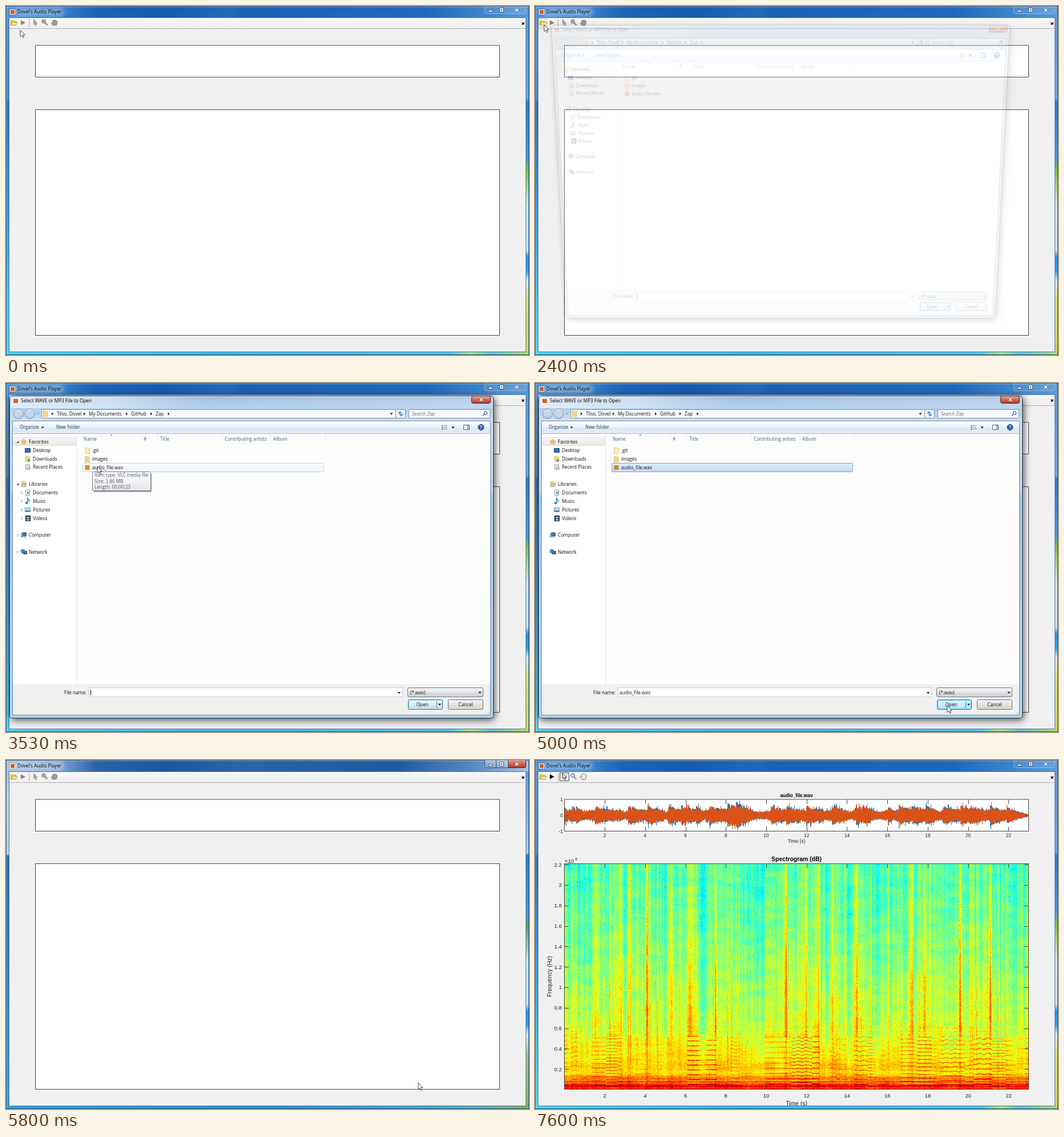
These frames come from a looping animation (916x611 px, 7740 ms). An HTML page with a canvas:

```html
<!DOCTYPE html>
<html lang="en">
<head>
<meta charset="utf-8">
<title>Audio player</title>
<style>
html, body { margin: 0; width: 100%; height: 100%; overflow: hidden; background: #f0f0f0; }
canvas, svg { position: absolute; left: 0; top: 0; }
#dialog { transform-origin: 430px 304px; }
</style>
</head>
<body>
<canvas id="main" width="916" height="611"></canvas>
<canvas id="dialog" width="916" height="611"></canvas>
<svg id="cursor" width="12" height="18" viewBox="-1 -1 12 18"><path d="M0 0V11.6L2.7 9.2 4.6 13.4 6.4 12.6 4.6 8.6H8.2Z" fill="#fff" stroke="#222" stroke-width=".8"/></svg>
<script>
const $ = id => document.getElementById(id);
const mainCtx = $('main').getContext('2d'), dialogCtx = $('dialog').getContext('2d');
const UI = '8.2px "Open Sans", "Noto Sans", sans-serif';
const plotFont = (size, bold = '') => `${bold} ${size}px "Liberation Sans", Arial, sans-serif`;
let g = mainCtx;

const clamp = (v, a = 0, b = 1) => Math.min(b, Math.max(a, v));
function seeded(s) {
  return () => {
    s = s + 0x6D2B79F5 | 0;
    let r = Math.imul(s ^ s >>> 15, 1 | s);
    r = r + Math.imul(r ^ r >>> 7, 61 | r) ^ r;
    return ((r ^ r >>> 14) >>> 0) / 4294967296;
  };
}

// Drawing helpers on the current context g
function grad(x0, y0, x1, y1, ...stops) {
  const l = g.createLinearGradient(x0, y0, x1, y1);
  for (let i = 0; i < stops.length; i += 2) l.addColorStop(stops[i], stops[i + 1]);
  return l;
}
const down = (y, h, a, b) => grad(0, y, 0, y + h, 0, a, 1, b);
function fill(x, y, w, h, c) { g.fillStyle = c; g.fillRect(x, y, w, h); }
function box(x, y, w, h, bg, edge, r = 0) {
  g.beginPath();
  g.roundRect(x + .5, y + .5, w - 1, h - 1, r);
  if (bg) { g.fillStyle = bg; g.fill(); }
  if (edge) { g.strokeStyle = edge; g.lineWidth = 1; g.stroke(); }
}
function path(d, x, y, bg, edge, w = 1) {
  const p = new Path2D(d);
  g.save();
  g.translate(x, y);
  if (bg) { g.fillStyle = bg; g.fill(p); }
  if (edge) { g.strokeStyle = edge; g.lineWidth = w; g.stroke(p); }
  g.restore();
}
function disc(x, y, r, bg, edge, w = 1) {
  g.beginPath();
  g.arc(x, y, r, 0, 7);
  if (bg) { g.fillStyle = bg; g.fill(); }
  if (edge) { g.strokeStyle = edge; g.lineWidth = w; g.stroke(); }
}
// y is the visual middle of the line
function text(s, x, y, color = '#111', font = UI, align = 'left') {
  g.font = font; g.fillStyle = color; g.textAlign = align;
  g.fillText(s, x, y + parseFloat(font.match(/[\d.]+px/)) * .36);
}
const arrowRight = (x, y, c = '#222') => path('M-1.5-2.8L1.6 0-1.5 2.8Z', x, y, c);
const arrowDown = (x, y, c = '#222') => path('M-2.8-1.5H2.8L0 1.7Z', x, y, c);
const folder = (x, y, c = '#f3d77a') => path('M-4-5H0L1-4H4V5H-4Z', x, y, c, '#d5b455', .6);
function captionMark(x, kind) {
  if (kind === 'min') box(x - 4, 7, 8, 4, '#fff', '#456');
  if (kind === 'max') { box(x - 4, 3, 8, 8, '#fff', '#456'); fill(x - 1.5, 6, 3, 2, '#456'); }
  if (kind === 'close') {
    path('M-2.6-2.6L2.6 2.6M2.6-2.6L-2.6 2.6', x, 7, null, '#456', 3);
    path('M-2.6-2.6L2.6 2.6M2.6-2.6L-2.6 2.6', x, 7, null, '#fff', 1.6);
  }
}

// Plot geometry: seconds and kHz to pixels
const timeX = s => 51.3 + s * 35.37, freqY = k => 577 - k * 17.9;
const dips = [[58, 5], [86, 13], [157, 4], [229, 3], [294, 7], [392, 17], [507, 9], [552, 6], [601, 10], [628, 6], [706, 6], [845, 20]];
const hits = [[105, .05], [152, .06], [197, .1], [239, .09], [271, .13], [316, .14], [439, .14], [475, .1], [519, .07], [564, .08], [659, .13], [681, .14], [745, .13], [797, .16]];
const beats = [51, 72, 105, 163, 197, 233, 256, 282, 305, 337, 352, 413, 440, 475, 497, 520, 562, 575, 618, 637, 661, 684, 715, 745, 762, 797, 826];
const near = (x, c, w) => Math.exp(-(((x - c) / w) ** 2));
const quiet = x => dips.reduce((s, [c, w]) => s + near(x, c, w), 0);

function makeSpectrogram() {
  const W = 813, H = 394, rnd = seeded(7);
  const c = Object.assign(document.createElement('canvas'), { width: W, height: H });
  const ctx = c.getContext('2d'), img = ctx.createImageData(W, H);
  const profile = [[0, .9], [.35, .88], [.8, .79], [1.6, .71], [3, .655], [5.1, .62], [5.6, .585], [9, .565], [12, .535], [16, .5], [22.1, .465]];
  const base = k => {
    const i = Math.max(1, profile.findIndex(p => p[0] >= k));
    const [a, u] = profile[i - 1], [b, v] = profile[i];
    return u + (v - u) * (k - a) / (b - a);
  };
  const blobs = Array.from({ length: 2000 }, rnd);
  const blob = (x, y) => {
    const i = x | 0, j = y | 0, u = x - i, v = y - j, at = (a, b) => blobs[(a * 37 + b) % 2000];
    return (at(i, j) * (1 - u) + at(i + 1, j) * u) * (1 - v) + (at(i, j + 1) * (1 - u) + at(i + 1, j + 1) * u) * v - .5;
  };
  const rowLine = Array.from({ length: H }, () => rnd() ** 4);
  let band = 0, bandEnd = 0, pitch = .3, noteEnd = 0, loud = 1, bend = 0;
  for (let x = 0; x < W; x++) {
    const sx = x + 52, calm = quiet(sx);
    if (x >= bandEnd) { band = (rnd() - .5) * .1; bandEnd = x + 1 + rnd() * 5; }
    if (x >= noteEnd) { pitch = .28 + rnd() * .24; loud = rnd() * 1.1; bend = rnd() < .3 ? .015 : 0; noteEnd = x + 9 + rnd() * 28; }
    let column = band + (rnd() - .5) * .04 + (rnd() < .06 ? .07 : 0);
    for (const b of beats) column += .05 * near(sx, b, 1.5);
    let hit = 0;
    for (const [p, a] of hits) hit += a * near(sx, p, 3);
    const f0 = pitch * (1 + bend * Math.sin(x / 2.3));
    for (let y = 0; y < H; y++) {
      const k = (H - y) / 17.9;
      let v = base(k) + column * clamp(k / 6, .25) - calm * clamp(k / 7, .3) * .055;
      v += hit * clamp((k - 4.3) / 1.5, .2) * clamp(1.45 - k / 24);
      v += blob(x / 20, y / 9) * .07 + (rnd() + rnd() - 1) * .075;
      if (k < 5.2) {
        const line = Math.max(0, Math.cos(2 * Math.PI * k / f0)) ** 3;
        v += (line * .2 - .045) * loud * clamp(1.2 - calm);
      } else if (k < 12) v += rowLine[y] * (rnd() < .5 ? .12 : 0) * loud * (12 - k) / 6;
      if (k < 1.9) v += (rowLine[y] - .3) * .15;
      if (rnd() < .004) v -= .15;
      v = clamp(v, .2, .98);
      const o = (y * W + x) * 4;
      [3, 2, 1].forEach((m, i) => img.data[o + i] = 255 * clamp(1.5 - Math.abs(4 * v - m)));
      img.data[o + 3] = 255;
    }
  }
  ctx.putImageData(img, 0, 0);
  return c;
}
const spectrogram = makeSpectrogram();

function waveform() {
  const rnd = seeded(21);
  const bars = { '#0072bd': [], '#d95319': [] };
  for (let x = 52; x < 864; x++) {
    const last = beats.filter(b => b <= x).pop();
    const env = (.29 + .27 * Math.exp((last - x) / 16) + .16 * near(x, 354, 20)) * (1 - .35 * clamp(quiet(x))) * clamp((868 - x) / 24, .12);
    for (const c in bars) {
      const size = () => 27 * Math.min(.97, env * (.78 + rnd() * .45 + (rnd() < .08 ? .45 : 0)));
      bars[c].push([x, size(), size()]);
    }
  }
  for (const c in bars) for (const [x, up, dn] of bars[c]) fill(x, 97 - up, 1, up + dn, c);
}

const AXIS = '#484848';
function axes() {
  box(51, 68.5, 814, 56.5, null, AXIS);
  box(51, 181, 814, 396, null, AXIS);
}
function ticks(x, y, w, h, ys) {
  for (let s = 2; s < 23; s += 2) {
    const tx = Math.round(timeX(s));
    fill(tx, y, 1, 8, AXIS); fill(tx, y + h - 8, 1, 8, AXIS);
  }
  for (const ty of ys) {
    fill(x, Math.round(ty), 8, 1, AXIS); fill(x + w - 8, Math.round(ty), 8, 1, AXIS);
  }
}

function drawPlots() {
  const small = plotFont(8.4), mid = plotFont(9.5), big = plotFont(10.4), ink = '#262626';
  waveform();
  g.drawImage(spectrogram, 52, 182);
  const freqs = Array.from({ length: 11 }, (_, i) => 2 + 2 * i);
  ticks(51, 69, 814, 56, [97]);
  ticks(51, 181, 814, 396, freqs.map(freqY));
  for (let s = 2; s < 23; s += 2) {
    text(s, timeX(s), 131.5, ink, small, 'center');
    text(s, timeX(s), 587.5, ink, mid, 'center');
  }
  [1, 0, -1].forEach(v => text(v, 49, 97 - 28 * v, ink, small, 'right'));
  freqs.forEach(k => text(k / 10, 47, freqY(k), ink, mid, 'right'));
  text('audio_file.wav', 458, 62, '#000', plotFont(8.4, 'bold'), 'center');
  text('Time (s)', 458, 142, ink, small, 'center');
  text('Spectrogram (dB)', 458, 173, '#000', plotFont(10.4, 'bold'), 'center');
  text('Time (s)', 458, 601, ink, big, 'center');
  text('×10', 52, 177, ink, mid);
  text('4', 70, 173, ink, plotFont(7.5));
  g.save();
  g.translate(25, 379);
  g.rotate(-Math.PI / 2);
  text('Frequency (Hz)', 0, 0, ink, big, 'center');
  g.restore();
}

function toolbarIcons(on, hover) {
  if (hover) box(6, 22, 15, 15, '#fdfdfd', '#b5b5b5');
  path('M0 2H4L5 3H9V10H0Z', 8.5, 23.5, '#f5d55c', '#b08a1c', .8);
  path('M0 10L2.5 5H11L9 10Z', 8.5, 23.5, '#fbe98c', '#b08a1c', .8);
  path('M0 0L8 4.2 0 8.4Z', 26, 25, on ? '#000' : '#808080');
  fill(40, 23, 1, 14, '#aaa');
  if (on) box(43, 22, 17, 15, '#e4e4e4', '#555');
  path('M0 0V9L2 7.2 3.6 11 5.2 10.3 3.6 6.7H6.5Z', 48.5, 23.5, on ? '#fff' : '#aaa', on ? '#222' : '#888', .9);
  path('M2.5 2.5L6.5 6.5', 66, 27, null, on ? '#c08a4a' : '#888', 2.4);
  disc(66, 27, 3.2, on ? '#cfe6fb' : '#aaa', on ? '#4a7fb8' : '#888', 1.2);
  path('M2 10L-1 6 0 5 2 6.2 1.5 1.8 3 1.4 4 .4 5.3 .6 6.5 .4 7.6 1.4 9.2 2 9.6 6 8 10Z', 80, 24, on ? '#fff3e2' : '#999', on ? '#555' : '#808080', .8);
  path('M-2-2L1 1M2-1.5V2H-1.5Z', 905, 30, '#000', '#000');
}

function drawMain(t) {
  g = mainCtx;
  const active = t >= 60 && t < 2195 || t >= 5395 && t < 7590, plotted = t >= 5860;
  const warm = active ? '#5f9a55' : '#7cc143';
  fill(0, 0, 916, 611, active
    ? grad(0, 0, 0, 611, 0, '#8fb2da', .1, '#c3d3e8', .27, '#b4cae6', .275, '#1c5fa6', .6, '#1f7cc4', 1, '#2f9fdd')
    : grad(0, 0, 0, 611, 0, '#4f90d2', .27, '#3b82cc', .275, '#1b69be', .6, '#2a95e4', .85, '#35c4f4', 1, '#3fd4f8'));
  fill(910, 20, 6, 591, grad(0, 20, 0, 611, 0, '#5e9bd8', .24, active ? '#b4cbe6' : '#68a8e4', .25, '#2a7ccb', .42, '#4a9be0', .45, warm, .5, active ? '#8fb59a' : '#a3d88a', .56, '#cfe6f2', .69, '#c4e2f4', .71, '#2593e6', .75, '#2b9ff0', .78, '#d5ecf2', .84, active ? '#a8bf80' : '#d8df72', 1, active ? '#8fb060' : '#c9d85c'));
  fill(0, 605, 916, 6, active
    ? grad(0, 0, 916, 0, 0, '#2f9fdd', .5, '#2a8ed0', .87, '#4fa9d0', 1, '#8fb060')
    : grad(0, 0, 916, 0, 0, '#3fd8f8', .4, '#35bdf0', .85, '#49c4ee', .89, '#a8e07c', .93, '#55c4d8', 1, '#b8dc60'));
  fill(0, 0, 916, 20, active
    ? grad(0, 0, 916, 0, 0, '#a9c3e2', .1, '#7fa6d4', .17, '#2b65a8', .3, '#1d579c', .45, '#2a64a6', .75, '#1f5a9e', .9, '#5c8cc2', 1, '#a9c3e2')
    : grad(0, 0, 916, 0, 0, '#4f92d8', .1, '#3a82cc', .17, '#1e62b6', .3, '#195aae', .43, '#2468ba', .45, '#1c60b4', .8, '#2068bc', .92, '#3f86cc', 1, '#5a9ad8'));
  fill(0, 0, 916, 1, '#2b4a70');
  fill(1, 1, 914, 1, '#ffffff66');
  fill(0, 0, 1, 611, '#24507f'); fill(1, 1, 1, 609, '#ffffff66');
  fill(915, 0, 1, 611, '#24507f'); fill(0, 610, 916, 1, '#245070');
  // Glow behind the caption
  g.save();
  g.filter = 'blur(4px)';
  fill(16, 5, 84, 11, '#ffffff70');
  g.restore();
  fill(5, 20, 906, 586, '#5c7fa5');
  fill(6, 21, 904, 584, '#f0f0f0');
  fill(6, 21, 904, 18, down(21, 18, '#f7f7f7', '#efefef'));
  fill(6, 39, 904, 1, '#b4b4b4');
  fill(7, 6, 9, 9, '#f6f6f6');
  fill(8, 7, 7, 7, '#d4602a');
  text("Dovel's Audio Player", 20, 10.5, '#000');
  box(838, -3, 73, 17, active ? down(0, 14, '#ffffff66', '#ffffff22') : '#ffffff14', active ? '#34567f' : '#ffffff55', 3);
  if (active) {
    box(879, -3, 32, 17, down(0, 14, '#dc9a8c', '#b5301f'), '#5a2020', 3);
    fill(858, 0, 1, 13, '#34567f'); fill(879, 0, 1, 13, '#34567f');
  }
  captionMark(848.5, 'min'); captionMark(868, 'max'); captionMark(894.5, 'close');
  toolbarIcons(plotted, t >= 930 && t < 2600);
  fill(51, 69, 814, 56, '#fff');
  fill(51, 181, 814, 396, '#fff');
  if (plotted) {
    g.save();
    g.beginPath(); g.rect(6, 40, 904, 565); g.clip();
    drawPlots();
    g.restore();
  }
  axes();
  if (t >= 1860 && t < 2195) {
    box(15, 46, 27, 13, '#fff', '#777', 1);
    text('Open', 18, 52.5, '#555');
  }
}

const places = [
  ['Favorites', 103, 0, (x, y) => path('M0-5L1.5-1.6 5-1.4 2.3.9 3.2 4.4 0 2.5-3.2 4.4-2.3.9-5-1.4-1.5-1.6Z', x, y, '#fbc52c', '#d8921a', .7)],
  ['Desktop', 118, 1, (x, y) => box(x - 5, y - 4, 10, 8, '#2f6fc0', '#24446c')],
  ['Downloads', 133, 1, (x, y) => { folder(x, y); path('M-1 0H1V2H3L0 5-3 2H-1Z', x + 2, y, '#2f7fd0'); }],
  ['Recent Places', 147.5, 1, (x, y) => { box(x - 4, y - 5, 8, 9, '#e8eef5', '#8896a8'); disc(x + 2, y + 2, 2.6, '#cfe0f0', '#667a90', .8); }],
  ['Libraries', 177, 0, (x, y) => { folder(x, y); fill(x - 4, y - 1, 9, 5, '#7fb8e0'); fill(x - 3, y + 1, 7, 2, '#f3d77a'); }],
  ['Documents', 192, 1, (x, y) => { box(x - 4, y - 5, 8, 10, '#fff', '#8090a4'); fill(x - 1, y - 2, 3, 4, '#4a86c8'); }],
  ['Music', 207, 1, (x, y) => { path('M0 3V-5C1-2 4-2 3 1', x, y, null, '#2a7fd0', 1.5); disc(x - 1.8, y + 3, 2.2, '#2a7fd0'); }],
  ['Pictures', 222, 1, (x, y) => { box(x - 5, y - 4, 10, 8, '#bfe0f5', '#8090a4'); fill(x - 4, y + 1, 8, 2, '#3f8a9c'); }],
  ['Videos', 237, 1, (x, y) => { box(x - 4, y - 5, 9, 10, '#333f50', '#222'); fill(x - 2, y - 3, 5, 3, '#7fb4e0'); fill(x - 2, y + 1, 5, 3, '#7fb4e0'); }],
  ['Computer', 266.5, 0, (x, y) => { box(x - 3, y - 5, 8, 7, '#3a78c4', '#40566e'); box(x - 5, y - 3, 3, 7, '#c8d2de', '#75859a'); fill(x - 1, y + 3, 5, 1, '#7a8a9c'); }],
  ['Network', 296, 0, (x, y) => { disc(x - 1.5, y - 1.5, 3.5, '#3f9ad8', '#2a6aa0', .7); box(x - 1, y - 2, 7, 6, '#3a68b4', '#40566e'); }]
];

function drawGlass() {
  g.save();
  g.shadowColor = 'rgba(0,0,0,.75)'; g.shadowBlur = 13; g.shadowOffsetX = 2; g.shadowOffsetY = 3;
  box(6, 22, 848, 565, '#a9c9ea', null, 5);
  g.restore();
  box(6, 22, 848, 565, grad(0, 22, 0, 586, 0, '#9fc1e6', .04, '#b4cfec', .08, '#cfdff1', .3, '#bad3ee', .31, '#9cc3ea', .7, '#a9cdf0', 1, '#a5d2f0'), '#1c2c40', 5);
  fill(8, 24, 844, 20, grad(8, 0, 852, 0, 0, '#ffffffa0', .2, '#ffffff70', .4, '#ffffff00', 1, '#ffffff30'));
  box(7, 23, 846, 563, null, '#ffffffa0', 4);
  fill(12, 27, 10, 9, '#f6f6f6');
  fill(13, 28, 8, 7, '#d4602a');
  text('Select WAVE or MP3 File to Open', 26, 31.5, '#000');
  box(815, 22, 34, 14, down(23, 13, '#e2a294', '#b5301f'), '#5a2020', 3);
  g.save(); g.translate(-62, 22); captionMark(894.5, 'close'); g.restore();
}

function drawAddress() {
  for (const x of [22, 41.5]) {
    disc(x, 54, 8.5, down(45, 18, '#e6eff9', '#a9c2de'), '#7d95b2');
    disc(x, 54, 6, '#c3d5e9');
  }
  arrowDown(56, 54, '#8fa6c0');
  box(62, 46, 621, 16, '#f7fafd', '#7d93ac');
  folder(69, 54);
  [['Tilso, Dovel', 89, 81.5], ['My Documents', 145, 137.5], ['GitHub', 219, 211.5], ['Zap', 262, 254.5]].forEach(([s, x, a]) => {
    arrowRight(a, 54); text(s, x, 54);
  });
  arrowRight(285, 54);
  arrowDown(675, 54);
  box(682, 46, 18, 16, '#eaf2fa', '#7d93ac');
  path('M-4 0L-1-3V-1H2M4 1L1 4V2H-2', 691, 53.5, null, '#2a6fc0', 1.3);
  box(705, 46, 143, 16, '#f7fafd', '#7d93ac');
  text('Search Zap', 711, 54, '#6d6d6d', 'italic ' + UI);
  disc(840, 52.5, 2.6, null, '#3a6ea8', 1.2);
  path('M0 0L-3 3', 838, 54.5, null, '#3a6ea8', 1.6);
}

function drawDialog(t) {
  g = dialogCtx;
  g.clearRect(0, 0, 916, 611);
  const picked = t >= 4130, hoverRow = t >= 3060 && t < 4600, hoverOpen = t >= 4860;
  drawGlass();
  drawAddress();
  box(11, 66, 838, 516, '#fcfcfc', '#6f8eb0');
  // Command bar
  fill(12, 67, 836, 22, grad(0, 67, 0, 89, 0, '#fbfdff', .5, '#e9f1fa', .52, '#dde8f5', 1, '#e3edf8'));
  fill(12, 88, 836, 1, '#a5b9d2');
  if (t >= 2600 && t < 2790) box(14, 69, 63, 17, '#f4f9ff', '#b3c6de', 2);
  text('Organize', 24, 77.5, '#1e395b'); arrowDown(64, 78, '#1e395b');
  text('New folder', 88, 77.5, '#1e395b');
  for (let i = 0; i < 3; i++) { fill(763, 74 + 3 * i, 3, 2, '#7a8ea8'); fill(767, 74 + 3 * i, 6, 1, '#7a8ea8'); }
  arrowDown(783, 78);
  box(801, 73, 11, 9, '#fff', '#48648a'); fill(807, 74, 4, 7, '#9fc0e4');
  disc(832, 77.5, 5, '#2a5fb0', '#173f80');
  text('?', 832, 77.5, '#fff', 'bold ' + UI, 'center');
  // Places
  fill(12, 89, 111, 438, '#fff');
  fill(123, 89, 1, 438, '#dfe6ee');
  box(12, 95, 111, 15, down(95, 15, '#f8f8f8', '#e6e6e6'), '#e2e2e2', 2);
  const twist = clamp((t - 2950) / 250) * clamp((4400 - t) / 400);
  for (const [name, y, inner, icon] of places) {
    icon(inner ? 38 : 31, y);
    text(name, inner ? 47 : 40, y);
    if (!twist || name === 'Desktop' || name === 'Downloads' || name === 'Recent Places') continue;
    g.globalAlpha = twist;
    if (name === 'Favorites' || name === 'Libraries') path('M2-2V2H-2Z', 20.5, y, '#444');
    else path('M-1.3-2.4L1.4 0-1.3 2.4Z', inner ? 28 : 21, y, '#fff', '#a6a6a6', .8);
    g.globalAlpha = 1;
  }
  // Files
  [['Name', 136], ['#', 241], ['Title', 270], ['Contributing artists', 383], ['Album', 468]].forEach(([s, x]) => text(s, x, 98, '#4c607a'));
  [237, 265, 378, 463, 559].forEach(x => fill(x, 90, 1, 13, '#e4ebf3'));
  path('M-2.5 1.2L0-1.5 2.5 1.2Z', 184.5, 91, '#7aa6cc');
  if (picked) box(134, 140, 423, 16, down(141, 15, '#dcebfc', '#c1dbfc'), '#7da2ce', 2);
  else if (hoverRow) box(134, 140, 423, 16, down(141, 15, '#fafcfe', '#ebf3fd'), '#b8d6fb', 2);
  folder(142.5, 118.5, '#f8ebc0'); folder(142.5, 133.5);
  fill(138.5, 144, 8, 8, '#e8801e');
  ['.git', 'images', 'audio_file.wav'].forEach((s, i) => text(s, 151, 118.5 + 15 * i));
  if (!picked && t >= 3395) {
    g.globalAlpha = clamp((t - 3350) / 150);
    fill(154, 158, 101, 33, '#00000055');
    box(151, 155, 103, 34, down(155, 34, '#ffffff', '#e4e5f0'), '#767676', 2);
    ['Item type: VLC media file', 'Size: 3.86 MB', 'Length: 00:00:23'].forEach((s, i) => text(s, 155, 161 + 10.6 * i, '#575757'));
    g.globalAlpha = 1;
  }
  // Bottom pane
  fill(12, 527, 836, 54, '#f0f0f0');
  text('File name:', 141, 542, '#111', UI, 'right');
  box(145, 533, 550, 17, '#fff', '#c3cfdd');
  if (picked) text('audio_file.wav', 148, 542.5);
  else if ((t - 2395) % 1060 < 530) fill(148, 537, 1, 10, '#000');
  arrowDown(688.5, 542.5);
  box(703, 533, 133, 17, grad(0, 533, 0, 550, 0, '#f0f0f0', .5, '#e6e8ea', .52, '#d9dcdf', 1, '#cdd2d6'), '#777c82', 2);
  text('(*.wav)', 708, 542); arrowDown(830, 542);
  const glow = .75 + .25 * Math.cos((t - 2670) / 320);
  box(704, 554, 61, 18, hoverOpen ? down(554, 18, '#e9f5fc', '#b2ddf4') : down(554, 18, '#f2f4f5', '#cfdbe2'), '#3c7fb1', 2);
  box(705, 555, 59, 16, null, `rgba(70,205,248,${glow})`, 1);
  fill(754, 557, 1, 12, '#3c7fb1');
  text('Open', 729, 563, '#111', UI, 'center'); arrowDown(759.5, 563);
  box(774, 554, 62, 18, down(554, 18, '#f3f3f3', '#d2d2d2'), '#707070', 2);
  text('Cancel', 805, 563, '#111', UI, 'center');
  for (let i = 0; i < 3; i++) for (let j = 0; j <= i; j++) fill(846 - 2 * j, 575 + 2 * i, 1, 1, '#b0b0b0');
}

const route = [[0, 25, 42], [70, 25, 42], [400, 14, 50], [540, 14, 50], [1070, 16, 33], [2400, 16, 33], [2670, 77, 75], [2930, 128, 113], [3130, 160, 146], [4540, 160, 146], [4930, 722, 565], [6000, 722, 565], [6200, 722, 586], [7740, 722, 586]];
function pointer(t) {
  const i = route.findIndex(p => p[0] > t), [a, x, y] = route[i - 1], [b, u, v] = route[i];
  const p = (t - a) / (b - a), e = p * p * (3 - 2 * p);
  return [x + (u - x) * e, y + (v - y) * e];
}

function show(t) {
  drawMain(t);
  const dlg = $('dialog'), open = t >= 2380 && t < 5590;
  dlg.style.display = open ? 'block' : 'none';
  if (open) {
    drawDialog(t);
    const enter = clamp((t - 2350) / 250), leave = clamp((t - 5350) / 250);
    const tilt = ((1 - enter) / .8) ** 2 + leave;
    dlg.style.opacity = enter * (1 - leave);
    dlg.style.transform = tilt ? `perspective(1080px) translateY(${-6 * tilt}px) rotateX(${-8 * tilt}deg) scale(${1 - .083 * tilt})` : 'none';
  }
  const [x, y] = pointer(t), cur = $('cursor');
  cur.style.display = t < 7590 ? 'block' : 'none';
  cur.style.transform = `translate(${Math.round(x) - 1}px, ${Math.round(y) - 1}px)`;
}

const start = performance.now(), LOOP = 7740;
let shown = -1;
function frame() {
  const step = Math.floor(((performance.now() - start) % LOOP + 4) * .015);
  if (step !== shown) show(Math.min((shown = step) * 1000 / 15, LOOP - 1));
  requestAnimationFrame(frame);
}
frame();
</script>
</body>
</html>
```
